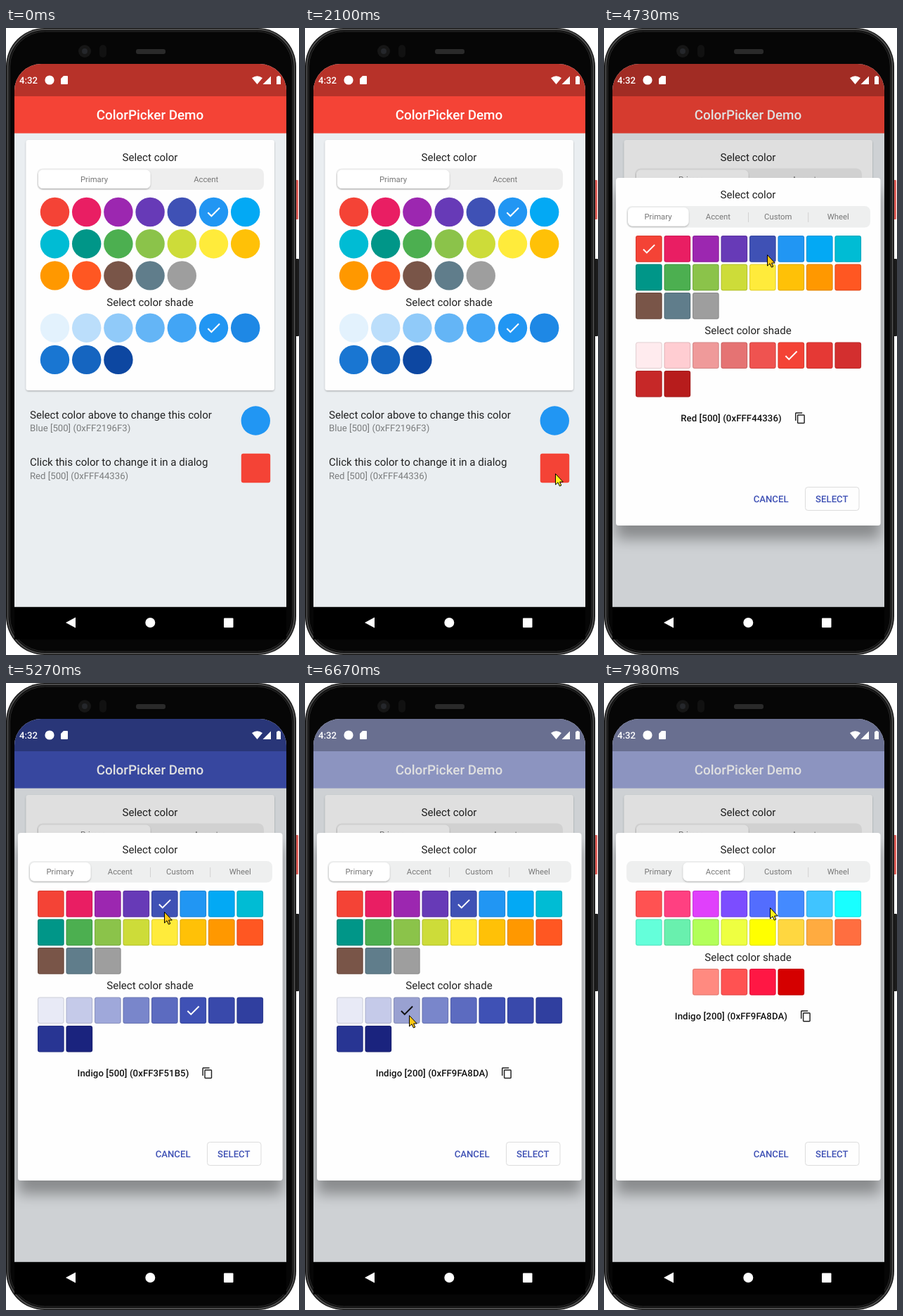
Animation, 417 px wide and 891 px high, one loop 8000 ms. Source, as an HTML page:

```html
<!DOCTYPE html>
<html lang="en">
<head>
<meta charset="utf-8">
<title>ColorPicker Demo</title>
<style>
html, body { margin: 0; width: 100%; height: 100%; overflow: hidden; background: #fff; }
svg { display: block; width: 100%; height: 100%; font-family: Roboto, sans-serif; text-rendering: geometricPrecision; }
</style>
</head>
<body>
<svg id="stage" viewBox="0 0 417 891" xmlns="http://www.w3.org/2000/svg"></svg>
<script>
const LOOP = 8000;
const DP = 387 / 411;
const hex = s => s.split(' ').map(c => '#' + c);

const primary = hex('F44336 E91E63 9C27B0 673AB7 3F51B5 2196F3 03A9F4 00BCD4 009688 4CAF50 8BC34A CDDC39 FFEB3B FFC107 FF9800 FF5722 795548 607D8B 9E9E9E');
const accent = hex('FF5252 FF4081 E040FB 7C4DFF 536DFE 448AFF 40C4FF 18FFFF 64FFDA 69F0AE B2FF59 EEFF41 FFFF00 FFD740 FFAB40 FF6E40');
const shades = {
  blue: hex('E3F2FD BBDEFB 90CAF9 64B5F6 42A5F5 2196F3 1E88E5 1976D2 1565C0 0D47A1'),
  red: hex('FFEBEE FFCDD2 EF9A9A E57373 EF5350 F44336 E53935 D32F2F C62828 B71C1C'),
  indigo: hex('E8EAF6 C5CAE9 9FA8DA 7986CB 5C6BC0 3F51B5 3949AB 303F9F 283593 1A237E'),
  redAccent: hex('FF8A80 FF5252 FF1744 D50000')
};

// Markup helpers
const rect = (x, y, w, h, fill, rx = 0, more = '') =>
  `<rect x="${x}" y="${y}" width="${w}" height="${h}" rx="${rx}" fill="${fill}" ${more}/>`;
const circle = (x, y, r, fill, more = '') =>
  `<circle cx="${x}" cy="${y}" r="${r}" fill="${fill}" ${more}/>`;
const path = (d, fill, more = '') => `<path d="${d}" fill="${fill}" ${more}/>`;
const text = (s, x, y, dp, fill = '#222', more = 'text-anchor="middle"') =>
  `<text x="${x}" y="${y}" font-size="${(dp * DP).toFixed(2)}" fill="${fill}" ${more}>${s}</text>`;
const check = (x, y, k, fill) =>
  path('M9 16.17L4.83 12l-1.42 1.41L9 19 21 7l-1.41-1.41z', fill,
    `transform="translate(${x - 12 * k} ${y - 12 * k}) scale(${k})"`);
const group = (id, body, more = '') => `<g id="${id}" ${more}>${body}</g>`;

function dots(colors, cy, picked) {
  const step = 48 * DP;
  return colors.map((c, i) => {
    const x = 69.5 + (i % 7) * step, y = cy + Math.floor(i / 7) * step;
    return circle(x, y, 22 * DP, c) + (i === picked ? check(x, y, 1.035, '#fff') : '');
  }).join('');
}

function tiles(colors, top, picked, mark = '#fff', left = 45) {
  const step = 43 * DP, size = 40 * DP;
  return colors.map((c, i) => {
    const x = left + (i % 8) * step, y = top + Math.floor(i / 8) * step;
    return rect(x, y, size, size, c, 3) +
      rect(x + .5, y + .5, size - 1, size - 1, 'none', 2.6, 'stroke="#000" stroke-opacity=".12"') +
      (i === picked ? check(x + size / 2, y + size / 2, 1, mark) : '');
  }).join('');
}

function info(label, iconX, y) {
  const k = .73;
  return text(label, 181, y + 4.8, 14, '#111', 'text-anchor="middle" font-weight="500" letter-spacing=".094"') +
    path('M16 1H4c-1.1 0-2 .9-2 2v14h2V3h12V1zm3 4H8c-1.1 0-2 .9-2 2v14c0 1.1.9 2 2 2h11c1.1 0 2-.9 2-2V7c0-1.1-.9-2-2-2zm0 16H8V7h11v14z',
      '#222', `transform="translate(${iconX - 11.5 * k} ${y - 12 * k}) scale(${k})"`);
}

const picker = (family, main, shade, mark, label, iconX) =>
  tiles(primary, 295, main) + text('Select color shade', 205, 435, 16) +
  tiles(shades[family], 446.4, shade, mark) + info(label, iconX, 554.3);

const phone = () =>
  rect(412, 216, 4, 56, '#e0605a', 1) + rect(412, 328, 5, 110, '#1b1b1b', 1) +
  rect(0, 0, 413, 891, '#101010', 55) +
  rect(2.5, 2, 408, 887, 'none', 53, 'stroke="#4c4c4c" stroke-width="2"') +
  rect(5.500, 5, 402, 881, '#060606', 50, 'stroke="#2a2a2a"') +
  circle(112, 33, 9, '#161616') + circle(112, 33, 4, '#25272b') +
  rect(133, 24, 10, 18, '#111', 5) + rect(185, 30, 42, 7, '#2a2a2a', 3) +
  rect(12, 822.7, 387, 46, '#000') +
  path('M85 845L99 837.5V852.5Z', '#fff') + circle(205.3, 845, 7, '#fff') + rect(310, 838.5, 13.5, 13.5, '#fff', 1);

const page = () =>
  rect(12, 51, 387, 772, '#EAEEF1') +
  rect(12, 51, 387, 98.6, primary[0], 0, 'id="bar"') + rect(12, 51, 387, 46, '#000', 0, 'opacity=".25"') +
  text('ColorPicker Demo', 205, 130.3, 20, '#fff', 'text-anchor="middle" font-weight="500"') +
  rect(28.5, 159, 353.5, 356, '#fefefe', 3.8, 'filter="url(#low)"') +
  text('Select color', 205, 188.5, 16) +
  rect(44, 199.5, 323, 30.5, '#eeeeee', 8) + rect(46, 201.5, 159.5, 26.5, '#fff', 6.5, 'filter="url(#low)"') +
  text('Primary', 125.5, 218.6, 12, '#777') + text('Accent', 284.7, 218.6, 12, '#777') +
  dots(primary, 261.5, 5) + text('Select color shade', 205, 394.5, 16) + dots(shades.blue, 426.2, 5) +
  text('Select color above to change this color', 34, 554.5, 16, '#222', '') +
  text('Blue [500] (0xFF2196F3)', 34, 573, 14, '#7b7d7e', '') + circle(355.3, 558, 20.7, primary[5]) +
  text('Click this color to change it in a dialog', 34, 622.4, 16, '#222', '') +
  text('Red [500] (0xFFF44336)', 34, 640.8, 14, '#7b7d7e', '') + rect(334.8, 604.8, 41.4, 41.4, primary[0], 3);

const status = () =>
  text('4:32', 19, 79, 14, '#fff', 'font-weight="500"') + circle(62, 74, 6.6, '#fff') +
  path('M82 68h5q1 0 1 1v10q0 1-1 1h-8q-1 0-1-1v-7z', '#fff') +
  path('M350 71Q357.5 65.5 365 71L357.5 80Z', '#fff') +
  path('M377 68.5V80H365.5Z', '#fff') +
  path('M386.5 69.3v-1.3h3v1.3h1.5v10.700h-6v-10.700z', '#fff');

const dialog = () =>
  rect(12, 51, 387, 772, '#000', 0, 'opacity=".12"') +
  rect(17, 213, 376.5, 494, '#fefefe', 4, 'filter="url(#high)"') +
  text('Select color', 205, 242.4, 16) + rect(32, 253, 347, 30.5, '#eeefef', 8) +
  rect(205, 262, .9, 14, '#cfcfcf', 0, 'id="divider"') + rect(290.3, 262, .9, 14, '#cfcfcf') +
  rect(34, 255, 86.5, 26.5, '#fff', 6.5, 'id="thumb" filter="url(#low)"') +
  ['Primary', 'Accent', 'Custom', 'Wheel'].map((s, i) => text(s, 77 + i * 85.4, 272.4, 12, '#777')).join('') +
  group('red', picker('red', 0, 5, '#fff', 'Red [500] (0xFFF44336)', 278.9)) +
  group('indigo', picker('indigo', 4, 5, '#fff', 'Indigo [500] (0xFF3F51B5)', 286.3)) +
  group('pale', picker('indigo', 4, 2, '#111', 'Indigo [200] (0xFF9FA8DA)', 286.9)) +
  group('accents', tiles(accent, 295) + text('Select color shade', 205, 394.6, 16) +
    tiles(shades.redAccent, 406, -1, '', 126) + info('Indigo [200] (0xFF9FA8DA)', 286.9, 473.4)) +
  rect(126, 446.4, 37.6, 37.6, '#000', 3, 'id="hover" opacity=".04"') +
  text('CANCEL', 237.6, 673.8, 14, primary[4], 'text-anchor="middle" font-weight="500"') +
  rect(286.5, 652.5, 76.5, 33, 'none', 3.8, 'stroke="#dcdcdc"') +
  text('SELECT', 324.3, 673.8, 14, primary[4], 'text-anchor="middle" font-weight="500"');

const shadow = (id, dy, blur, alpha) =>
  `<filter id="${id}" x="-20%" y="-20%" width="140%" height="150%"><feDropShadow dx="0" dy="${dy}" stdDeviation="${blur}" flood-opacity="${alpha}"/></filter>`;

document.getElementById('stage').innerHTML =
  `<defs>${shadow('low', 1.2, 1.3, .28)}${shadow('high', 19, 10, .34)}
  <clipPath id="screen"><path d="M12 822.700V89A38 38 0 0 1 50 51H361A38 38 0 0 1 399 89V822.700Z"/></clipPath></defs>` +
  phone() + group('view', page() + group('dialog', dialog()) + status(), 'clip-path="url(#screen)"') +
  group('cursor', circle(0, -1, 12, '#ff0', 'id="press" opacity=".47"') +
    path('M.5.5V16L4 12.800 6.400 18 8.800 17 6.600 12H11.300Z', '#ff0', 'id="arrow" stroke="#000" stroke-linejoin="round"'));

const $ = id => document.getElementById(id);
const show = (id, on) => $(id).setAttribute('display', on ? 'inline' : 'none');

// Cursor moves: first change, last change, number of changes, start, end
const moves = [
  [920, 1380, 7, [401, 719], [356, 633]],
  [4120, 4730, 9, [356, 633], [232, 322]],
  [5190, 5270, 2, [232, 322], [225, 325]],
  [5350, 6520, 16, [225, 325], [148, 472]],
  [6750, 7510, 11, [148, 472], [168, 271]],
  [7820, 7980, 3, [168, 271], [236, 319]]
];
const presses = [[1930, 2100], [4880, 5040], [6520, 6670], [7590, 7740]];

function stepped(t, t0, t1, n) {
  const k = Math.floor((t - t0) / ((t1 - t0) / (n - 1)) + 1e-6) + 1;
  return Math.max(0, Math.min(1, k / n));
}
const smooth = p => p * p * (3 - 2 * p);

function cursorAt(t) {
  const [t0, t1, n, a, b] = moves.filter(m => t >= m[0]).pop() || moves[0];
  const p = smooth(stepped(t, t0, t1, n));
  return a.map((v, i) => v + (b[i] - v) * p);
}

function draw(t) {
  const tab = t < 3640 ? '' : t < 5190 ? 'red' : t < 6670 ? 'indigo' : t < 7820 ? 'pale' : 'accents';
  show('dialog', tab);
  for (const id of ['red', 'indigo', 'pale', 'accents']) show(id, id === tab);
  show('divider', tab !== 'accents');
  show('hover', t >= 6520 && t < 6830);
  $('bar').setAttribute('fill', t < 5190 ? primary[0] : t < 6670 ? primary[4] : shades.indigo[2]);
  const slide = 1 - (1 - stepped(t, 7820, 7980, 3)) ** 1.5;
  $('thumb').setAttribute('x', 34 + 78.5 * slide);

  show('cursor', t >= 920);
  show('press', presses.some(([a, b]) => t >= a && t < b));
  const [x, y] = cursorAt(t);
  $('cursor').setAttribute('transform', `translate(${Math.round(x)} ${Math.round(y)})`);
  $('arrow').setAttribute('fill', t >= 3640 && t < 7510 ? '#ffc814' : '#fff21a');
}

const start = performance.now();
function tick() {
  draw((performance.now() - start) % LOOP);
  requestAnimationFrame(tick);
}
tick();
</script>
</body>
</html>
```
